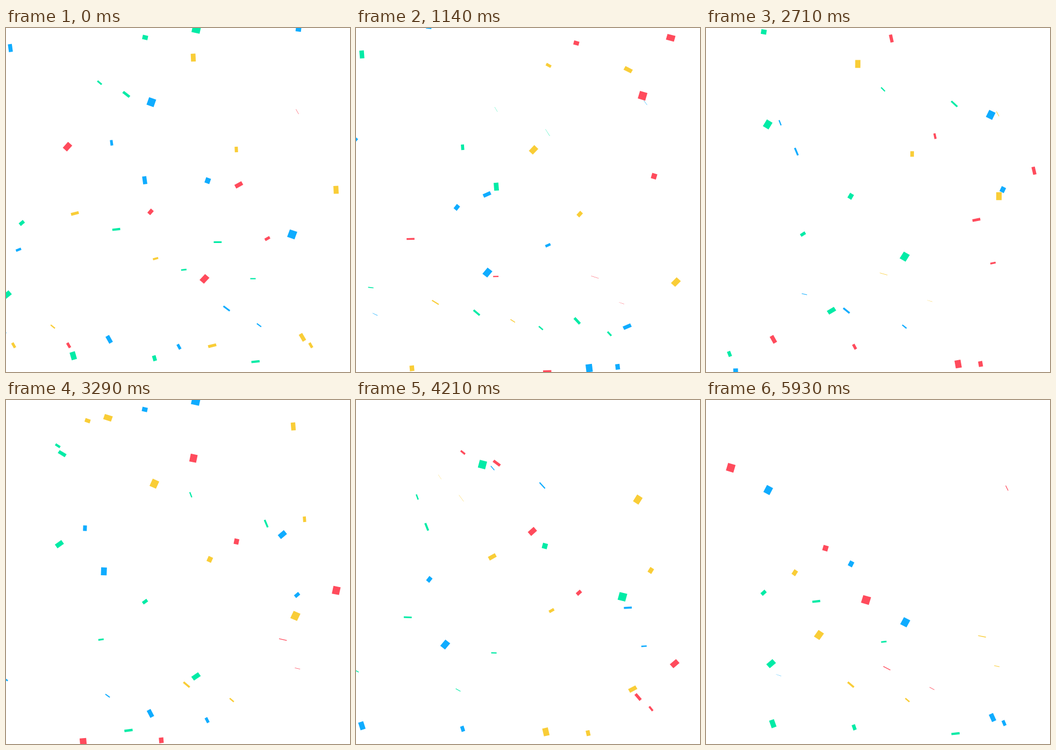
Animation, 640 px wide and 640 px high, one loop 6 s. Source, as an HTML page with a canvas:

```html
<!DOCTYPE html>
<html lang="en">
<head>
<meta charset="utf-8">
<title>Confetti</title>
<style>
  html, body { margin: 0; width: 100%; height: 100%; overflow: hidden; background: #fff; }
  canvas { display: block; width: 640px; height: 640px; }
</style>
</head>
<body>
<canvas id="stage" width="640" height="640"></canvas>
<script>
const ctx = document.getElementById('stage').getContext('2d');
const LOOP = 6000, STEPS = 84, TICKS = 150, LENGTH = 14.7;
const COLORS = { r: '#ff4b5c', g: '#00eba6', b: '#0facff', y: '#f9cd37' };

// Each piece: tick at which it crosses the top, column, colour
const PIECES = [
  [-114, 90.5, 'g'], [-106, 165.6, 'b'], [-105, -134.5, 'r'], [-105, -284.5, 'y'],
  [-105, 526, 'y'], [-92, -172, 'y'], [-91, 390.7, 'b'], [-68, 390.5, 'g'],
  [-64, 204.5, 'g'], [-59, 128, 'y'], [-55, -247, 'b'], [-50, 429, 'r'],
  [-43, -247, 'g'], [-38, 99, 'r'], [-24, 241.5, 'b'], [-10, 316, 'y'],
  [-7, -22.5, 'b'], [7, 503, 'r'], [20, -21, 'g'], [37, 92, 'g'],
  [40, 504, 'b'], [56, 249.5, 'y'], [64, 317, 'r'], [70, -97.5, 'b'],
  [74, 502.5, 'y'], [85, 204.5, 'g'], [107, -134, 'g'], [116, -58.5, 'y'],
  [120, 91, 'b'], [127, 15.8, 'r'], [154, 526, 'r']
];

// The whole shower is shown three times: scale x, scale y, offset x, offset y
const COPIES = [
  [0.682, 0.7, 190.9, 187.5],
  [1.046, 1, 249.6, 246],
  [1, 1, 0, 0]
];

const FALL = [[-45, -302], [-24, -146.2], [85, 499], [130, 671]];
const WIDTH = [[-45, 15.2], [-9, 0], [22, 14.4], [81, 0], [130, 15]];
const SWAY = [[-24, -4.7], [13, 33], [61, 0], [87, 19.7]];

const linear = p => p;
const wave = p => (1 - Math.cos(Math.PI * p)) / 2;

function between(keys, n, ease) {
  const i = keys.findIndex(k => k[0] >= n) || 1;
  const [n0, v0] = keys[i - 1], [n1, v1] = keys[i];
  return v0 + (v1 - v0) * ease((n - n0) / (n1 - n0));
}

function sway(n) {
  if (n < -24) return -4.7 + 0.073 * (n + 24) ** 2;
  if (n > 87) return 19.7 + 0.026 * Math.max(0, n - 90) ** 2;
  return between(SWAY, n, wave);
}

function drawPiece(n, column, color) {
  if (n < -45 || n > 130) return;
  const width = between(WIDTH, n, linear);
  ctx.save();
  ctx.translate(column + sway(n), between(FALL, n, linear));
  ctx.rotate(1.6 * (n - 68) * Math.PI / 180);
  ctx.fillStyle = COLORS[color];
  ctx.fillRect(-LENGTH / 2, -width / 2, LENGTH, width);
  ctx.restore();
}

function draw(now) {
  // 14 pictures per second, each taken from a 25-tick second
  const step = Math.floor((now % LOOP) / LOOP * STEPS + 0.1) % STEPS;
  const tick = Math.ceil(step * TICKS / STEPS);
  ctx.setTransform(1, 0, 0, 1, 0, 0);
  ctx.fillStyle = '#fff';
  ctx.fillRect(0, 0, 640, 640);
  for (const [sx, sy, x, y] of COPIES) {
    ctx.setTransform(sx, 0, 0, sy, x, y);
    for (const [start, column, color] of PIECES) drawPiece(tick - start, column, color);
  }
}

function loop() {
  draw(performance.now());
  requestAnimationFrame(loop);
}
loop();
</script>
</body>
</html>
```
